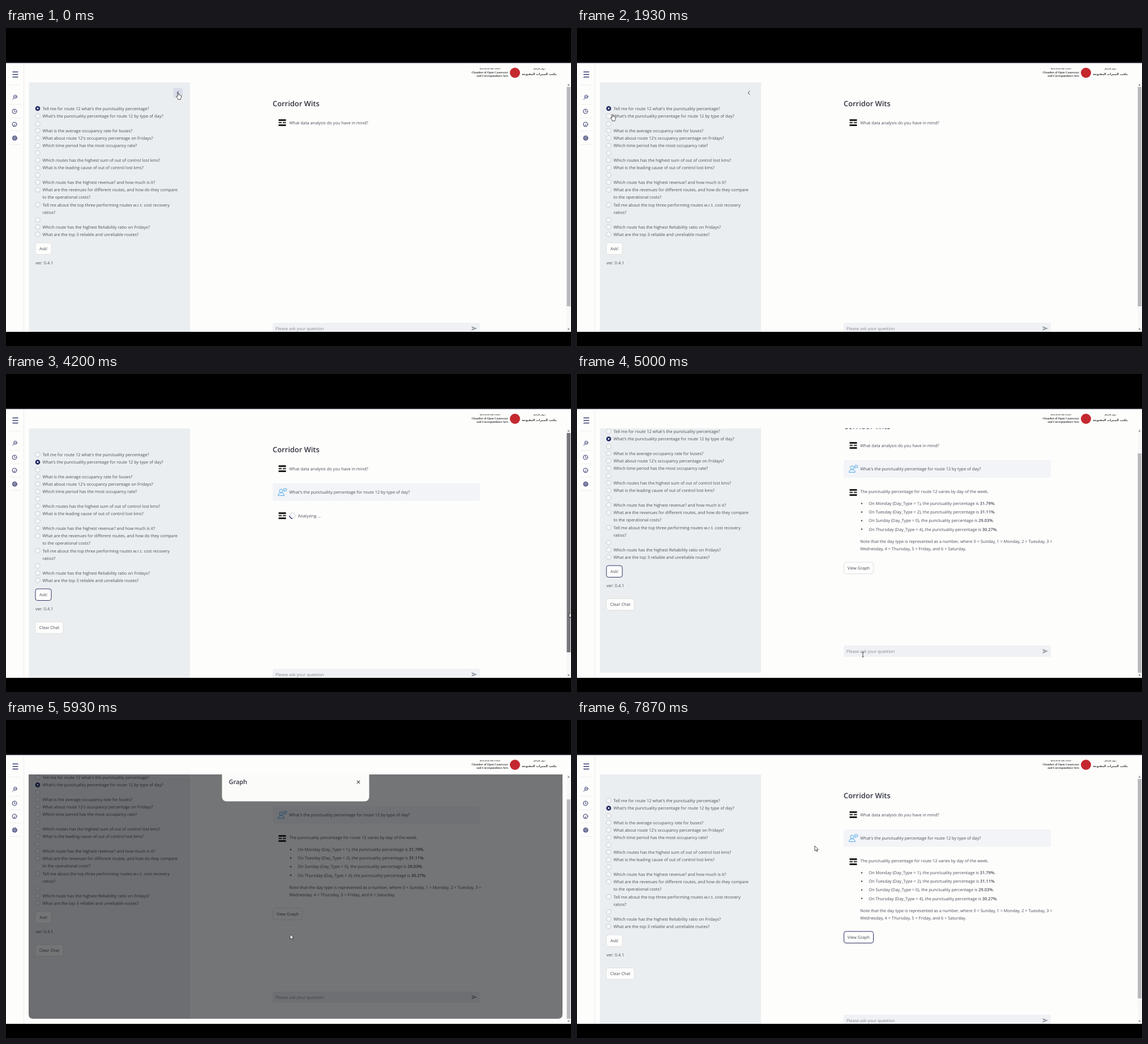
Recreate the animation shown at these times as an HTML page. Size 998 by 561 pixels, loop 7970 ms.

```html
<!DOCTYPE html>
<html lang="en">
<head>
<meta charset="utf-8">
<title>Transit assistant demo</title>
<style>
html, body { margin: 0; width: 100%; height: 100%; overflow: hidden; background: #000; }
svg { display: block; width: 100vw; height: 100vh; }
text { font: 7.38px "Open Sans", "Noto Sans", sans-serif; fill: #4b4d58; text-rendering: geometricPrecision; white-space: pre; }
.heading { font-size: 12.9px; font-weight: 600; fill: #31333f; }
.bold { font-weight: 600; }
.hint { fill: #858791; }
.axis { font-size: 6px; fill: #8d8f96; }
.crest { font: bold 5.1px "Liberation Serif", "Noto Serif", serif; fill: #333; }
.arabic { font: bold 5.2px "DejaVu Sans", sans-serif; fill: #333; }
.button { fill: #fdfdfc; stroke: #d8dade; stroke-width: .8; }
.button.focus { stroke: #2f3466; stroke-width: 1; }
.icon { fill: none; stroke: #34386f; stroke-width: 1; stroke-linecap: round; stroke-linejoin: round; }
</style>
</head>
<body>
<svg id="stage" viewBox="0 0 998 561" preserveAspectRatio="none"></svg>
<script>
const LOOP = 7970;
const NAVY = '#232c66';
const PAPER = '#fdfdfc';
const VIEW_TOP = 96;

// Moments of the story, in ms
const PICK = 2070, ASK = 2800, DRAG = 4200, DRAG_END = 4530, ANSWER = 4600;
const OPEN = 5540, CHART = 6130, WHEEL = 6400, WHEEL_END = 6930, CLOSE = 7130;

// Each option: row centre and its lines of text
const OPTIONS = [
  [142, "Tell me for route 12 what's the punctuality percentage?"],
  [155.5, "What's the punctuality percentage for route 12 by type of day?"],
  [169, ''],
  [181, 'What is the average occupancy rate for buses?'],
  [194, "What about route 12's occupancy percentage on Fridays?"],
  [207.5, 'Which time period has the most occupancy rate?'],
  [220.5, ''],
  [233, 'Which routes has the highest sum of out of control lost kms?'],
  [246.5, 'What is the leading cause of out of control lost kms?'],
  [259.5, ''],
  [272, 'Which route has the highest revenue? and how much is it?'],
  [285.5, 'What are the revenues for different routes, and how do they compare', 'to the operational costs?'],
  [311.8, 'Tell me about the top three performing routes w.r.t. cost recovery', 'ratios?'],
  [338.5, ''],
  [351, 'Which route has the highest Reliability ratio on Fridays?'],
  [364, 'What are the top 3 reliable and unreliable routes?']
];

// Day name, day type, percentage
const DAYS = [['Monday', 1, 31.79], ['Tuesday', 2, 31.11], ['Sunday', 0, 29.03], ['Thursday', 4, 30.27]];

const text = (x, y, s, cls = '', extra = '') => `<text x="${x}" y="${y + 2.7}" class="${cls}" ${extra}>${s}</text>`;
const rect = (x, y, w, h, fill, extra = '') => `<rect x="${x}" y="${y}" width="${w}" height="${h}" fill="${fill}" ${extra}/>`;
const group = (id, body, extra = '') => `<g id="${id}" ${extra}>${body}</g>`;
const middle = 'text-anchor="middle"';

function button(id, x, y, w, label) {
  return `<rect id="${id}" class="button" x="${x}" y="${y}" width="${w}" height="20.5" rx="3.5"/>` +
    text(x + w / 2, y + 10.2, label, '', middle);
}

function botAvatar(y) {
  return rect(481.5, y - 6, 13, 3, '#1b1b1b') + rect(481.5, y - 1.4, 5.6, 2.6, '#4a4a42') +
    rect(488.9, y - 1.4, 5.6, 2.6, '#4a4a42') + rect(481.5, y + 3, 13, 3, '#1b1b1b');
}

function userAvatar(y) {
  return `<g transform="translate(487.5 ${y})" fill="#e6f3fd" stroke="#4a9fe0" stroke-width=".9" stroke-linejoin="round">
    <path d="M-6.8 6.5Q-6.8 1.6-1.5 1.6Q3.8 1.6 3.8 6.5Z"/><circle cx="-1.5" cy="-1.8" r="3.1"/>
    <path d="M3.2-5.8H8V-2H5.6L4.2-.6V-2H3.2Z"/></g>`;
}

function sidebar() {
  const rows = OPTIONS.map(([y, ...lines], i) =>
    `<circle id="radio${i}" cx="56" cy="${y}" r="4.1"/>` +
    lines.map((line, k) => text(64.5, y + 13 * k, line)).join('')).join('');
  return rect(40.5, 0, 284.5, 568, '#ebeef0') +
    rect(295.5, 106, 16.5, 17, '#d9dcea', 'id="toggleHover" rx="3"') +
    '<path id="chevron" d="M305 111.5L302 114.3L305 117.1" class="icon"/>' +
    rows + button('ask', 52, 379, 28, 'Ask!') + text(52, 414.3, 'ver: 0.4.1') +
    group('clear', button('clearButton', 52, 437.3, 49, 'Clear Chat'));
}

function chat() {
  const bullets = DAYS.map(([day, type, pct], i) => {
    const y = 269.5 + 15.1 * i;
    return `<circle cx="503" cy="${y}" r="1.3" fill="#4b4d58"/>` +
      text(515.3, y, `On ${day} (Day_Type = ${type}), the punctuality percentage is <tspan class="bold">${pct}%</tspan>.`);
  }).join('');
  const answer = botAvatar(250) + text(500.3, 248.2, 'The punctuality percentage for route 12 varies by day of the week.') + bullets +
    text(500.3, 336.2, 'Note that the day type is represented as a number, where 0 = Sunday, 1 = Monday, 2 = Tuesday, 3 =') +
    text(500.3, 349.5, 'Wednesday, 4 = Thursday, 5 = Friday, and 6 = Saturday.') +
    button('view', 471.5, 373, 52, 'View Graph');
  const waiting = botAvatar(250) +
    `<circle cx="506" cy="250" r="5" fill="none" stroke="#dcdde2" stroke-width="1.3"/>
     <path id="spinner" d="M0 5A5 5 0 0 1-5 0" fill="none" stroke="${NAVY}" stroke-width="1.4"/>` +
    text(515.5, 250, 'Analyzing ...');
  return text(471, 134.8, 'Corridor Wits', 'heading') +
    botAvatar(167) + text(500.3, 166.8, 'What data analysis do you have in mind?') +
    group('question', rect(471, 193, 366, 31, '#f2f4f7', 'rx="3"') + userAvatar(208) + text(500.3, 208.3, OPTIONS[1][1])) +
    group('waiting', waiting) + group('answer', answer) +
    rect(471, 520, 366, 20, '#eff1f4', 'rx="3"') + text(476, 530.3, 'Please ask your question', 'hint') +
    '<path d="M822 526L832 530L822 534L823.5 530.8L828 530L823.5 529.2Z" fill="#969aa6"/>';
}

function chart() {
  const base = 189, unit = 4.1;
  let out = '';
  for (let v = 0; v <= 35; v += 5) {
    const y = base - v * unit;
    const labelY = Math.max(47.8, Math.min(186, y));
    out += rect(423, y - .3, 207, .6, '#e9eaee') + text(416, labelY - .6, v, 'axis', 'text-anchor="end"');
  }
  [...DAYS].sort((a, b) => a[1] - b[1]).forEach(([, type, pct], i) => {
    const x = 430.2 + 51.3 * i;
    out += rect(x, base - pct * unit, 39.2, pct * unit, '#0868c4') +
      text(0, 0, type, 'axis', `${middle} transform="translate(${x + 19} 199) rotate(-90)"`);
  });
  return out + text(527, 211.5, 'Day_Type', 'axis', `${middle} style="font-size:6.9px"`) +
    text(0, 0, 'Punctuality_Percentage', 'axis', `${middle} style="font-size:6.7px" transform="translate(397.5 117) rotate(-90)"`);
}

function modal() {
  return `<rect id="modalBox" x="381.5" width="260" rx="8" fill="${PAPER}"/>` +
    text(393.5, 23.7, 'Graph', 'heading', 'style="font-size:10.9px"') +
    '<path d="M620.2 20L624.8 24.6M624.8 20L620.2 24.6" class="icon" style="stroke:#444;stroke-width:1.1"/>' +
    group('chart', chart());
}

function frame() {
  const lines = [100.5, 134, 158, 181.5, 205].map(y => rect(6, y, 20, .6, '#e4e4ea')).join('');
  const icons = `<g class="icon">
    <path d="M12 77.5H21M12 82H21M12 86.5H21" stroke-width="1.4"/>
    <circle cx="16.4" cy="121.2" r="2.9"/><path d="M14.2 123.4L11.8 126M15.2 121.2H17.6"/>
    <circle cx="15" cy="147" r="3.9"/><path d="M15 144.7V147L16.7 148"/>
    <circle cx="15" cy="170" r="3.9"/><path d="M15 170.4L16.6 168.6M13.3 172H16.7" stroke-width=".8"/>
    <circle cx="15.3" cy="194.2" r="3.9"/><path d="M11.5 193H19M11.5 195.6H19M15.3 190.4V198M13.4 191V197.5M17.2 191V197.5" stroke-width=".8"/></g>`;
  const crest = text(855, 70.5, 'REALM OF THE COAST', 'crest', `${middle} style="font-size:3.2px"`) +
    text(887, 77, 'Chamber of Open Causeways', 'crest', 'text-anchor="end"') +
    text(887, 83.3, 'and Correspondence Arts', 'crest', 'text-anchor="end"') +
    '<circle cx="899" cy="79" r="9" fill="#c4282f"/>' +
    text(942, 70.5, 'ديوان الساحل', 'arabic', `${middle} style="font-size:3.2px"`) +
    text(942, 80.5, 'مكتب الممرات المفتوحة', 'arabic', middle);
  return rect(0, 62, 998, 474, PAPER) + rect(0, 61.5, 998, 1.2, '#d9d5e3') +
    rect(31, 63, 1, 473, '#ebebef') + lines + icons + crest +
    rect(990, 96, 8, 440, '#f7f7f8') +
    '<path d="M993.7 98.7L995.6 101.5H991.8ZM993.7 533L995.6 530.2H991.8Z" fill="#777"/>' +
    '<rect id="thumb" x="990.5" width="6.6" height="387"/>';
}

const cursors = `<g id="cursor" stroke="#222" stroke-width=".8" stroke-linejoin="round" fill="#fff">
  <path id="arrow" d="M0 0V9L2.1 7.2 3.5 10.2 4.8 9.6 3.5 6.7H6.3Z"/>
  <path id="hand" d="M-.9 .9Q0-.5 .9 .9V4Q2 3.3 2.6 4.3Q3.7 3.7 4.2 4.8Q5.4 4.5 5.5 5.8V8Q5.4 9.5 4.4 10.8V12H-.3V10.9L-2.9 7.4Q-3.2 5.8-1.9 6.1L-.9 7Z"/>
  <path id="beam" d="M-1.6-4H1.6M0-4V4M-1.6 4H1.6" fill="none"/></g>`;

const stage = document.getElementById('stage');
stage.innerHTML = `<defs><clipPath id="view"><path d="M40 96H990V536H40Z"/></clipPath></defs>` + frame() +
  `<g clip-path="url(#view)">` +
  group('page', sidebar() + chat() + '<path id="shade" d="M40 0H983V560Q983 568 975 568H48Q40 568 40 560Z" fill="#04060a"/>' + group('modal', modal())) +
  '</g>' + cursors + rect(0, 536, 998, 25, '#000');

const el = {};
stage.querySelectorAll('[id]').forEach(node => el[node.id] = node);

const show = (id, on) => el[id].style.display = on ? '' : 'none';
const focus = (id, on) => el[id].classList.toggle('focus', on);
const progress = (t, a, b) => Math.max(0, Math.min(1, (t - a) / (b - a)));
const ease = p => p * p * (3 - 2 * p);

// Pointer stops: time, x, y
const PATH = [
  [0, 304, 114], [270, 304, 114], [1670, 62.5, 152], [2200, 62.5, 152], [2670, 66, 388], [2930, 66, 388],
  [3900, 995, 421], [DRAG, 995, 421], [DRAG_END, 995, 457], [5000, 505, 495], [5130, 505, 495],
  [5430, 500, 343], [5600, 500, 343], [5800, 501.5, 377], [5930, 502, 378], [6330, 854, 299],
  [6870, 854, 299], [7070, 622, 149], [7200, 622, 149], [7800, 420, 222], [LOOP, 420, 222]
];

function pointer(t) {
  const i = PATH.findIndex(stop => stop[0] > t);
  const [t0, x0, y0] = PATH[i - 1], [t1, x1, y1] = PATH[i];
  const p = ease(progress(t, t0, t1));
  return [x0 + (x1 - x0) * p, y0 + (y1 - y0) * p];
}

function pointerKind(t, x, y) {
  const inside = (x0, y0, x1, y1) => x >= x0 && x <= x1 && y >= y0 && y <= y1;
  if (t >= OPEN && t < CLOSE) return inside(615, 140, 630, 160) ? 'hand' : 'arrow';
  if (inside(471, 520, 837, 540)) return 'beam';
  const clickable = inside(295, 106, 312, 123) || inside(51, 137, 280, 369) ||
    inside(52, 379, 80, 400) || (t >= ANSWER && inside(471, 373, 524, 394));
  return clickable ? 'hand' : 'arrow';
}

function render(t) {
  const scroll = 41 * (progress(t, DRAG, DRAG_END) - progress(t, WHEEL, WHEEL_END));
  el.page.setAttribute('transform', `translate(0 ${-Math.round(scroll)})`);
  el.thumb.setAttribute('y', 104 + scroll * .88);
  el.thumb.setAttribute('fill', t >= 3930 && t < DRAG_END + 70 ? '#77777b' : '#b9b9bd');

  const [x, y] = pointer(t);
  const kind = pointerKind(t, x, y + scroll);
  el.cursor.setAttribute('transform', `translate(${x} ${y})`);
  ['arrow', 'hand', 'beam'].forEach(k => show(k, k === kind));
  show('chevron', x < 325 && y > VIEW_TOP);
  show('toggleHover', x > 295 && x < 312 && y > 106 && y < 123);

  const picked = t < PICK ? 0 : 1;
  OPTIONS.forEach((_, i) => {
    const radio = el['radio' + i], on = i === picked;
    radio.setAttribute('r', on ? 2.9 : 4.1);
    radio.setAttribute('fill', on ? '#fff' : '#f5f7f8');
    radio.setAttribute('stroke', on ? NAVY : '#bcc1cc');
    radio.setAttribute('stroke-width', on ? 2.9 : .8);
  });

  focus('ask', t >= ASK && t < OPEN);
  focus('view', t >= CLOSE);
  show('question', t >= ASK + 70);
  show('clear', t >= ASK + 70);
  show('waiting', t >= ASK + 130 && t < ANSWER);
  show('answer', t >= ANSWER);
  el.spinner.setAttribute('transform', `translate(506 250) rotate(${(t - 4200) * .45})`);

  const fade = t < CLOSE ? progress(t, OPEN + 60, 5933) : 1 - progress(t, CLOSE, CLOSE + 200);
  show('modal', fade > 0);
  el.modal.setAttribute('opacity', fade);
  el.modal.setAttribute('transform', `translate(0 ${128 + 11 * (1 - fade)})`);
  el.shade.setAttribute('opacity', .55 * Math.min(1, fade * 1.17));
  show('chart', t >= CHART);
  el.modalBox.setAttribute('height', t >= CHART ? 243 : 56.5);
}

// The picture changes at 15 steps a second, on times rounded to 10 ms
function step(t) {
  const part = t % 200;
  return Math.min(7870, t - part + (part >= 130 ? 130 : part >= 70 ? 70 : 0));
}

const start = performance.now();
function tick() {
  render(step((performance.now() - start) % LOOP));
  requestAnimationFrame(tick);
}
tick();
</script>
</body>
</html>
```
